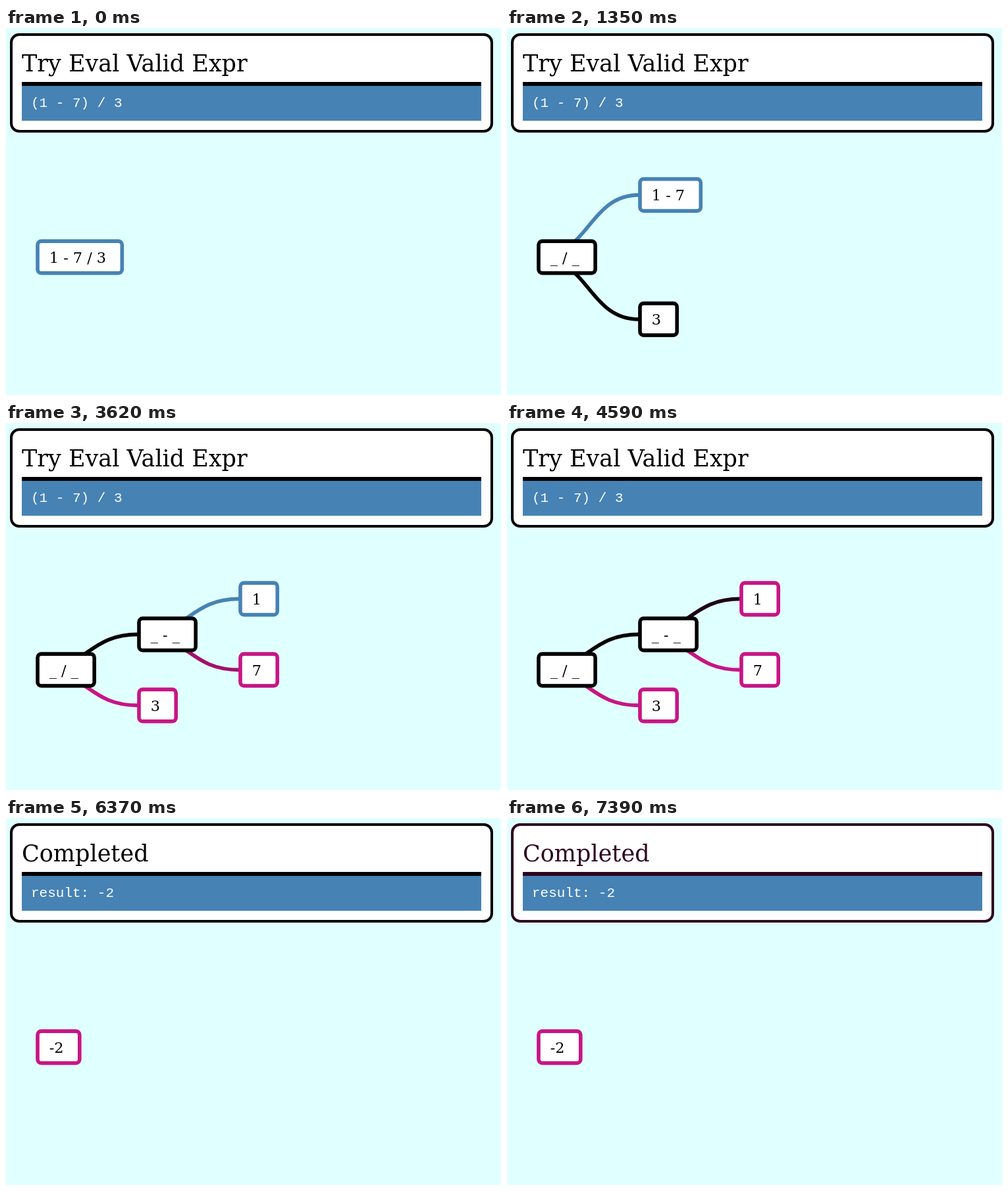
Recreate the animation shown at these times as an HTML page with a canvas. Size 752 px wide and 558 px high, loop 7470 ms.

```html
<!DOCTYPE html>
<html>
<head>
<meta charset="utf-8">
<style>
  html, body { margin: 0; width: 100%; height: 100%; overflow: hidden; background: #e0ffff; }
  canvas { display: block; }
</style>
</head>
<body>
<canvas id="stage" width="752" height="558"></canvas>
<script>
const ctx = document.getElementById('stage').getContext('2d');
const LOOP = 7470, MOVE = 280, FLASH = 580, DONE = 6365;
const BLACK = [0, 0, 0], BLUE = [70, 130, 180], PINK = [199, 21, 133];
const SERIF = '"DejaVu Serif", serif', MONO = '"Liberation Mono", monospace';
const LEFT = 45.2, MID = 348.4, STEP = 154, LINE = 5.6, BOX_H = 48.5;

const parent = { a: 'r', b: 'r', c: 'a', d: 'a' };
const depth = { r: 0, a: 1, b: 1, c: 2, d: 2 };

// Each step changes some nodes; null removes one.
const steps = [
  [0, { r: ['1 - 7 / 3', BLUE] }],
  [566, { r: ['_ / _', BLACK], a: ['1 - 7', BLUE], b: ['3', BLUE] }],
  [1070, { b: ['3', BLACK] }],
  [1630, { b: ['3', PINK] }],
  [2270, { a: ['_ - _', BLACK], c: ['1', BLUE], d: ['7', BLUE] }],
  [2850, { d: ['7', BLACK] }],
  [3393, { d: ['7', PINK] }],
  [3970, { c: ['1', BLACK] }],
  [4550, { c: ['1', PINK] }],
  [5158, { a: ['-6', PINK], c: null, d: null }],
  [5740, { r: ['-2', PINK], a: null, b: null }]
];
let nodes = {};
const states = steps.map(([start, change]) => {
  nodes = { ...nodes, ...change };
  return { start, nodes };
});

const lerp = (a, b, p) => a + (b - a) * p;
const mix = (a, b, p) => `rgb(${a.map((v, i) => Math.round(lerp(v, b[i], p)))})`;

// Absent nodes sit on their parent.
function place(state, id) {
  if (!state.nodes[id]) return place(state, parent[id]);
  const y = state.nodes.c ? { r: 27, a: -27, b: 81, c: -81, d: 27 }
                          : { r: 0, a: -94.5, b: 94.5 };
  return [LEFT + depth[id] * STEP, MID + y[id]];
}

function text(str, x, y, font, color) {
  ctx.font = font;
  ctx.fillStyle = color;
  ctx.fillText(str, x, y);
}

function roundBox(x, y, w, h, r, line, color) {
  ctx.beginPath();
  ctx.roundRect(x, y, w, h, r);
  ctx.fillStyle = '#fff';
  ctx.fill();
  ctx.lineWidth = line;
  ctx.strokeStyle = color;
  ctx.stroke();
}

function drawHeader(t) {
  const done = t >= DONE;
  const u = (done ? t - DONE : t) / FLASH;
  const color = mix(BLACK, PINK, Math.max(0, 1 - Math.abs(u - 1)));
  roundBox(8, 10, 730, 147, 12, 4, color);
  text(done ? 'Completed' : 'Try Eval Valid Expr', 24, 66, '35px ' + SERIF, color);
  ctx.fillRect(24, 82, 698, 6);
  ctx.fillStyle = mix(BLUE, BLUE, 0);
  ctx.fillRect(24, 88, 698, 53);
  text(done ? 'result: -2' : '(1 - 7) / 3', 38, 120, '21px ' + MONO, '#fff');
}

function drawEdge([x0, y0], [x1, y1], color) {
  const xm = (x0 + x1) / 2 + 1.5;
  ctx.beginPath();
  ctx.moveTo(x0 + 1.5, y0);
  ctx.bezierCurveTo(xm, y0, xm, y1, x1 + 1.5, y1);
  ctx.lineWidth = LINE;
  ctx.strokeStyle = color;
  ctx.stroke();
}

function drawNode([x, y], label, color, size) {
  ctx.font = '22.4px ' + SERIF;
  const w = ctx.measureText(label).width + 42;
  roundBox(x + LINE / 2, y - BOX_H / 2, w * size, BOX_H * size, 5.6, LINE, mix(color, color, 0));
  ctx.globalAlpha = size;
  text(label, x + 20.6, y + 8.5, ctx.font, '#000');
  ctx.globalAlpha = 1;
}

function drawTree(t) {
  const i = states.findLastIndex(s => t >= s.start);
  const now = states[i], old = states[Math.max(0, i - 1)];
  const p = Math.min(1, (t - now.start) / MOVE);
  const ids = Object.keys(depth).filter(id => now.nodes[id] || (old.nodes[id] && p < 1));
  const at = id => {
    const from = place(old, id), to = place(now, id);
    return from.map((v, k) => lerp(v, to[k], p));
  };
  for (const id of ids) {
    if (!parent[id]) continue;
    const to = now.nodes[id] || old.nodes[id], from = old.nodes[id] || to;
    drawEdge(at(parent[id]), at(id), mix(from[1], to[1], p));
  }
  for (const id of ids) {
    const [label, color] = now.nodes[id] || old.nodes[id];
    drawNode(at(id), label, color, now.nodes[id] ? 1 : 1 - p);
  }
}

const begin = performance.now();
function frame() {
  const t = (performance.now() - begin) % LOOP;
  ctx.fillStyle = '#e0ffff';
  ctx.fillRect(0, 0, 752, 558);
  drawHeader(t);
  drawTree(t);
  requestAnimationFrame(frame);
}
frame();
</script>
</body>
</html>
```
